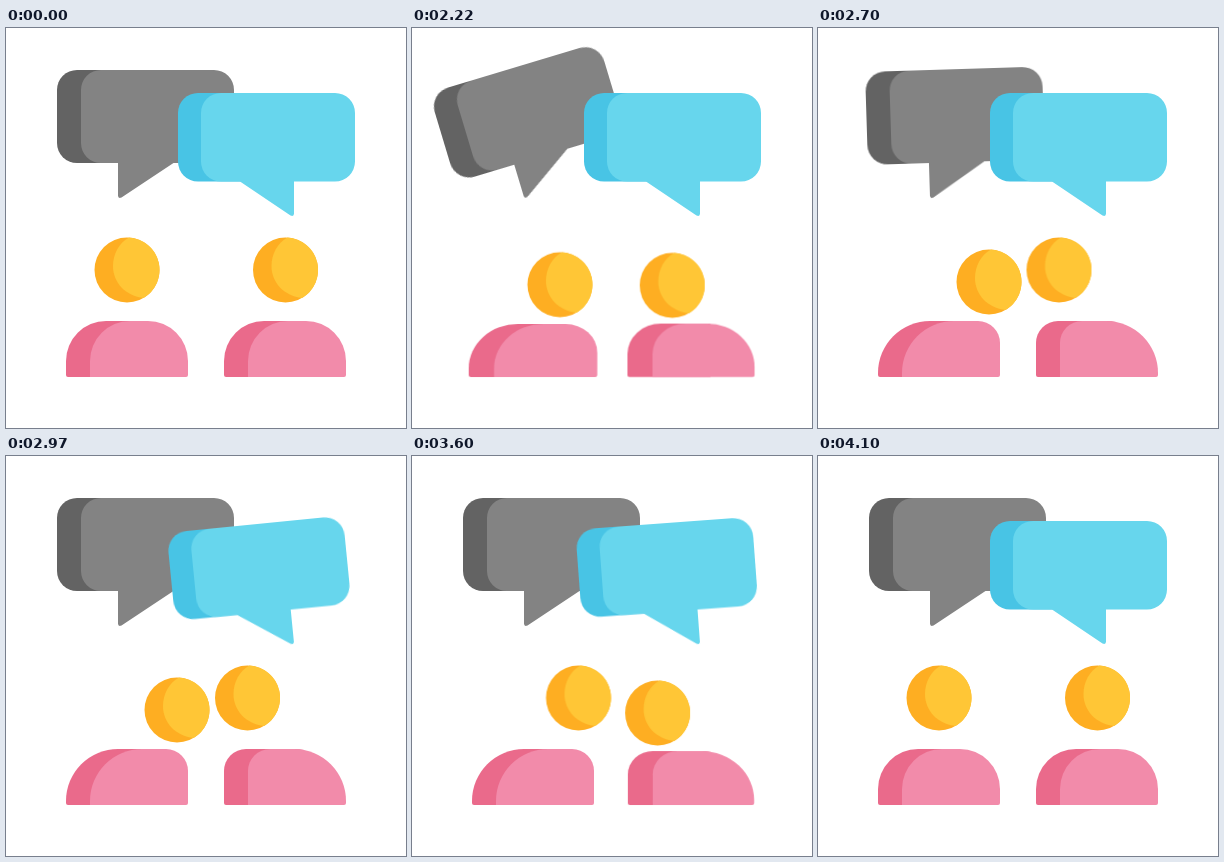
Animation of 400 by 400 pixels, one loop 4.12 s. Source, as an HTML page:

```html
<!DOCTYPE html>
<html lang="en">
<head>
<meta charset="utf-8">
<title>Two people talking</title>
<style>
  html, body { margin: 0; width: 100%; height: 100%; overflow: hidden; background: #fff; }
  .stage { position: relative; width: 400px; height: 400px; overflow: hidden; }
  svg { position: absolute; inset: 0; }

  .bubble, .head, .body { animation: 4120ms linear infinite; }

  .gray { transform-origin: 113px 169px; animation-name: swing-gray; }
  .blue { transform-origin: 287px 187px; animation-name: swing-blue; }

  .body {
    position: absolute; top: 293px; width: 121.5px; height: 56px;
    transform-origin: 50% 100%;
    border-radius: 40px 40px 2px 2px;
    background: linear-gradient(90deg, #ea6a8b 80px, transparent 0);
  }
  .body::after {
    content: ""; position: absolute; inset: 0 0 0 23.5px;
    border-radius: inherit; border-bottom-left-radius: 0;
    background: #f28baa;
  }
  .body.left { left: 60px; animation-name: body-left; }
  .body.right { left: 218px; animation-name: body-right; }
  .head.left { animation-name: head-left; }
  .head.right { animation-name: head-right; }

  /* Both bubbles swing -21, 15, -9, 3 degrees about the tip of the tail */
  @keyframes swing-gray {
    0%, 48.67% { transform: rotate(0deg); }
    53.35% { transform: rotate(-21deg); }
    58.05% { transform: rotate(15deg); }
    62.74% { transform: rotate(-9deg); }
    67.43% { transform: rotate(3deg); }
    72.08%, 100% { transform: rotate(0deg); }
  }
  @keyframes swing-blue {
    0%, 70.8% { transform: rotate(0deg); }
    75.69% { transform: rotate(-21deg); }
    80.58% { transform: rotate(15deg); }
    85.47% { transform: rotate(-9deg); }
    90.36% { transform: rotate(3deg); }
    95.25%, 100% { transform: rotate(0deg); }
  }

  /* Heads dip as they turn; the left one also nods */
  @keyframes head-left {
    0%, 48.54% { transform: translate(0, 0); }
    49.03% { transform: translate(1.5px, 1px); }
    50.97% { transform: translate(10px, 10px); }
    53.4% { transform: translate(24px, 16px); }
    55.83% { transform: translate(38px, 10px); }
    58.25% { transform: translate(45.5px, 1px); }
    59.95% { transform: translate(47.5px, 4.5px); }
    64.08%, 72.09% { transform: translate(50px, 12px); }
    78.16% { transform: translate(49.5px, 11px); }
    83.74%, 87.5% { transform: translate(45.5px, 0); }
    89.56% { transform: translate(41.5px, 15px); }
    91.99% { transform: translate(25px, 18px); }
    94.66% { transform: translate(9px, 12px); }
    97.82%, 100% { transform: translate(0, 0); }
  }
  @keyframes head-right {
    0%, 49.51% { transform: translate(0, 0); }
    51.7% { transform: translate(-8px, 11px); }
    54.25% { transform: translate(-21px, 16px); }
    56.8% { transform: translate(-34px, 10px); }
    59.22% { transform: translate(-39px, 0); }
    72.09%, 85.44% { transform: translate(-38px, 0); }
    87.38% { transform: translate(-34px, 15px); }
    89.8% { transform: translate(-22px, 18px); }
    92.48% { transform: translate(-8px, 12px); }
    95.39%, 100% { transform: translate(0, 0); }
  }

  /* Shoulders squash during a turn and slope away while leaning in */
  @keyframes body-left {
    0%, 48.54% { transform: scale(1); border-radius: 40px 40px 2px 2px; }
    53.4% { transform: scale(1.06, .94); }
    58.25%, 87.5% { transform: scale(1); border-radius: 52px 22px 2px 2px; }
    91.99% { transform: scale(1.066, .935); }
    97.82%, 100% { transform: scale(1); border-radius: 40px 40px 2px 2px; }
  }
  @keyframes body-right {
    0%, 49.51% { transform: scale(1); border-radius: 40px 40px 2px 2px; }
    54.25% { transform: scale(1.045, .95); }
    59.22%, 85.44% { transform: scale(1); border-radius: 22px 52px 2px 2px; }
    87.38% { transform: scale(1.035, .963); border-radius: 24px 51px 2px 2px; }
    89.8% { transform: scale(1.055, .945); }
    95.39%, 100% { transform: scale(1); border-radius: 40px 40px 2px 2px; }
  }
</style>
</head>
<body>
<div class="stage">
  <div class="body left"></div>
  <div class="body right"></div>
  <svg width="400" height="400" viewBox="0 0 400 400">
    <defs>
      <g id="head">
        <circle r="32.5" fill="#feae22"/>
        <path d="M2 -32.5C-8 -27 -14 -16 -14 -4C-14 13 -1 26 16.5 28A32.5 32.5 0 0 0 2 -32.5Z" fill="#ffc636"/>
      </g>
    </defs>

    <g class="bubble gray">
      <rect x="51" y="42" width="100" height="93" rx="20" fill="#636363"/>
      <path d="M95 42H208a20 20 0 0 1 20 20V115a20 20 0 0 1 -20 20H167.5L115.5 169.5Q112 171 112 167.5V135H95a20 20 0 0 1 -20 -20V62a20 20 0 0 1 20 -20Z" fill="#838383"/>
    </g>

    <g class="bubble blue">
      <rect x="172" y="65" width="100" height="88.5" rx="20" fill="#48c4e5"/>
      <path d="M215 65H329a20 20 0 0 1 20 20V133.500a20 20 0 0 1 -20 20H288V185.500Q288 189 284.500 187.500L234 153.500H215a20 20 0 0 1 -20 -20V85a20 20 0 0 1 20 -20Z" fill="#67d6ed"/>
    </g>

    <g class="head left"><use href="#head" x="121" y="242"/></g>
    <g class="head right"><use href="#head" x="279.5" y="242"/></g>
  </svg>
</div>
</body>
</html>
```
